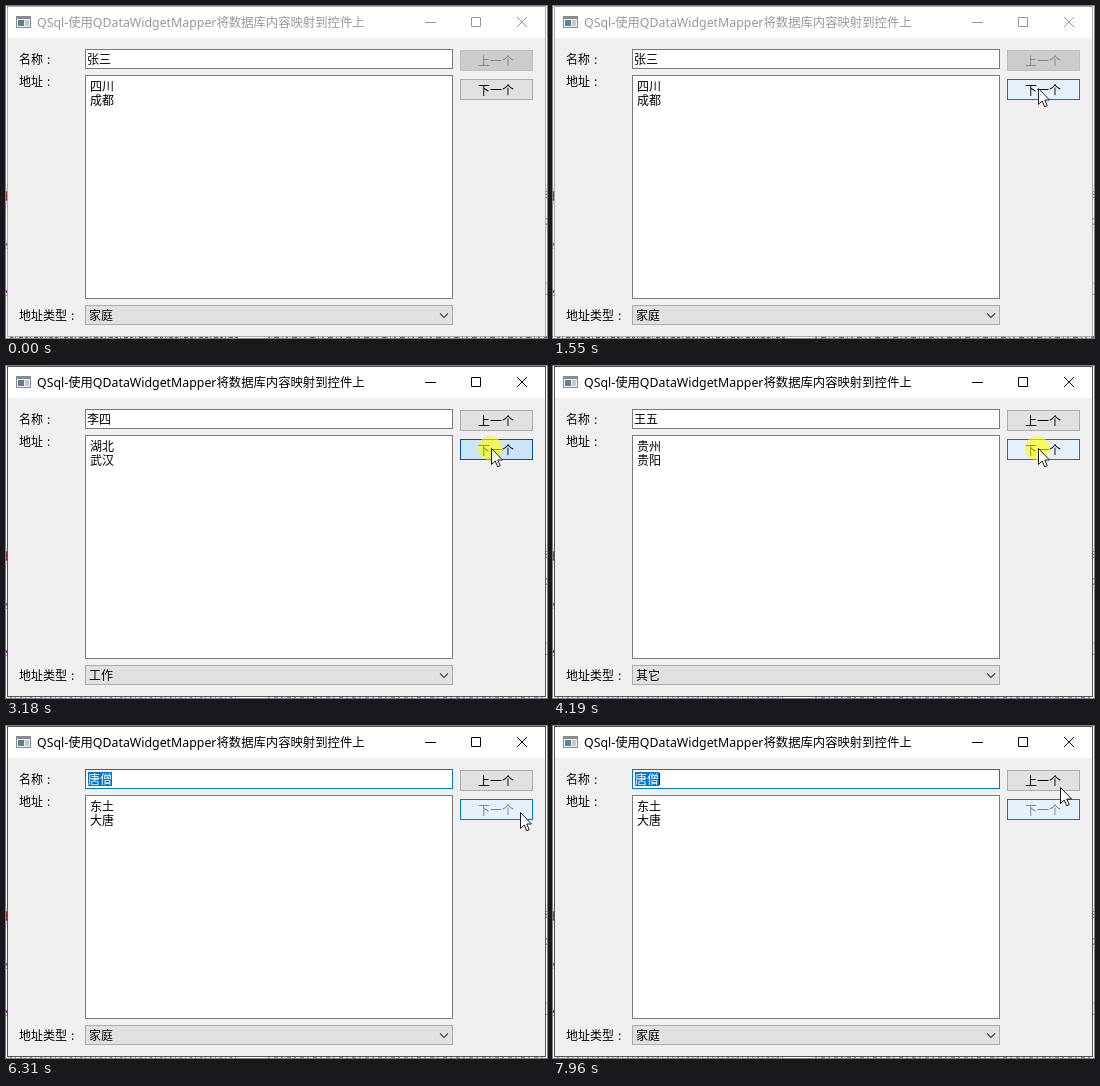
Recreate the animation shown at these times as an HTML page. Size 541 by 332 pixels, loop 8 s.

```html
<!DOCTYPE html>
<html lang="zh-CN">
<head>
<meta charset="utf-8">
<title>QDataWidgetMapper</title>
<style>
  html, body { margin: 0; width: 541px; height: 332px; overflow: hidden; background: #fff; }
  svg { display: block; }
  text { font: 12px "Noto Sans CJK SC", "Noto Sans CJK", "Noto Sans CJK JP", sans-serif; }
  .title { font: 12.35px "Noto Sans", "Noto Sans CJK SC", "Noto Sans CJK", "Noto Sans CJK JP", sans-serif; }
  .mid { text-anchor: middle; }
  .code { font: 13px "Noto Sans Mono", monospace; }
  .box { fill: #fff; stroke: #7a7a7a; }
  .flat { fill: #e1e1e1; stroke: #adadad; }
  .off { fill: #ccc; stroke: #bfbfbf; }
  .gray { fill: #838383; }
  .line { fill: none; stroke: currentColor; }

  /* Hard switches */
  .sw { opacity: 0; animation: 8s step-end infinite; }
  .idle { animation-name: idle; }
  .active { animation-name: active; }
  .r1 { animation-name: r1; }
  .r2 { animation-name: r2; }
  .r3 { animation-name: r3; }
  .r4 { animation-name: r4; }
  .open { animation-name: open; }
  .caret { animation-name: caret; }
  .click { animation-name: click; }
  .arrow { animation-name: arrow; }
  .beam { animation-name: beam; }
  @keyframes idle { 0% { opacity: 1 } 23.875%, 100% { opacity: 0 } }
  @keyframes active { 0% { opacity: 0 } 23.875%, 100% { opacity: 1 } }
  @keyframes r1 { 0% { opacity: 1 } 25.5%, 100% { opacity: 0 } }
  @keyframes r2 { 0%, 40.125%, 100% { opacity: 0 } 25.5% { opacity: 1 } }
  @keyframes r3 { 0%, 54.25%, 100% { opacity: 0 } 40.125% { opacity: 1 } }
  @keyframes r4 { 0% { opacity: 0 } 54.25%, 100% { opacity: 1 } }
  @keyframes open { 0% { opacity: 1 } 54.25%, 100% { opacity: 0 } }
  @keyframes caret {
    0%, 60.875%, 74.25%, 87.375% { opacity: 0 }
    54.25%, 67%, 80.625%, 94.125%, 100% { opacity: 1 }
  }
  @keyframes click {
    0%, 25.5%, 40.125%, 54.25%, 67%, 100% { opacity: 0 }
    23.875%, 38.25%, 52.375%, 64.75% { opacity: 1 }
  }
  @keyframes arrow { 0%, 4.9375% { opacity: 0 } 4.125%, 15.225%, 100% { opacity: 1 } }
  @keyframes beam { 0%, 15.225%, 100% { opacity: 0 } 4.9375% { opacity: 1 } }

  /* Button fades: normal, hover, pressed */
  .next { animation: next 8s linear infinite; }
  @keyframes next {
    0%, 16.8875% { fill: #e1e1e1; stroke: #adadad }
    19.375%, 23.875%, 25.6%, 38.25%, 42.25%, 52.375%, 56.125%, 100% { fill: #e5f1fb; stroke: #0078d7 }
    24.6875%, 25.5%, 39.2%, 40.125%, 53.4%, 54.25% { fill: #cce4f7; stroke: #005499 }
  }

  .pointer { animation: pointer 8s step-end infinite; }
  @keyframes pointer {
    0% { transform: translate(460px, 356px) }
    4.125% { transform: translate(460px, 356px); animation-timing-function: steps(3, start) }
    6.5625% { transform: translate(371px, 227px) }
    10.25% { transform: translate(371px, 227px); animation-timing-function: steps(9, start) }
    17.72% { transform: translate(479px, 90px); animation-timing-function: steps(3, start) }
    20.21% { transform: translate(485px, 82px) }
    76.5% { transform: translate(485px, 82px); animation-timing-function: steps(4, start) }
    79.6625% { transform: translate(514px, 86px); animation-timing-function: steps(3, start) }
    82.4625% { transform: translate(528px, 104px); animation-timing-function: steps(5, start) }
    86.875% { transform: translate(507px, 102px); animation-timing-function: steps(5, start) }
    90.9375% { transform: translate(507px, 87px) }
    94.125% { transform: translate(507px, 87px); animation-timing-function: steps(5, start) }
    99.5%, 100% { transform: translate(507px, 61px) }
  }
</style>
</head>
<body>
<svg width="541" height="332" viewBox="0 0 541 332">
  <defs>
    <g id="caption">
      <text class="title" x="31" y="21" fill="currentColor">QSql-使用QDataWidgetMapper将数据库内容映射到控件上</text>
      <path class="line" d="M419 16.5h11M465.5 11.5h9v9h-9zM511 11l10 10M521 11l-10 10"/>
    </g>
  </defs>

  <!-- Editor behind the window -->
  <rect width="541" height="332" fill="#fff"/>
  <g class="code">
    <text x="-5" y="195" fill="#800000">d</text>
    <text x="-5" y="217" fill="#d08030">l</text>
    <text x="-5" y="243" fill="#405090">e</text>
    <text x="-5" y="290" fill="#800080">e</text>
    <text x="538" y="192" fill="#208020">s</text>
    <text x="538" y="219" fill="#555">o</text>
    <text x="538" y="287" fill="#208020">[</text>
  </g>
  <g class="sw idle" fill="none" stroke-width="2">
    <path d="M4 331H234" stroke="#804080" stroke-dasharray="3 2 1 3 4 2"/>
    <path d="M262 331H541" stroke="#666" stroke-dasharray="2 4 5 3 1 3"/>
  </g>
  <g class="sw active" fill="none">
    <path d="M4 331.5H234" stroke="#a878a8" stroke-dasharray="2 3 1 4"/>
    <path d="M262 331.5H541" stroke="#78a078" stroke-dasharray="2 4 4 3"/>
  </g>

  <!-- Window -->
  <rect x="1.5" y=".5" width="538" height="330" fill="#f0f0f0" stroke="#aaa"/>
  <rect x="2" y="1" width="537" height="31" fill="#fff"/>
  <rect class="sw active" x="1.5" y=".5" width="538" height="330" fill="none" stroke="#555"/>
  <rect x="10.5" y="10.5" width="14" height="11" fill="#eef1f3" stroke="#8a9096"/>
  <rect x="10" y="10" width="15" height="3" fill="#858b91"/>
  <rect x="12" y="14" width="6" height="6" fill="#5f7f93"/>
  <rect x="19" y="14" width="4" height="6" fill="#c4cace"/>
  <g class="sw idle" color="#999"><use href="#caption"/></g>
  <g class="sw active" color="#000"><use href="#caption"/></g>

  <!-- Form -->
  <text x="13" y="58">名称</text><text x="41" y="58">:</text>
  <text x="13" y="80">地址</text><text x="41" y="80">:</text>
  <text x="13" y="314">地址类型</text><text x="65" y="314">:</text>
  <rect class="box" x="79.5" y="43.5" width="367" height="19"/>
  <rect class="box" x="79.5" y="69.5" width="367" height="223"/>
  <rect class="flat" x="79.5" y="299.5" width="367" height="19"/>
  <path class="line" d="M434 307.5l4 4 4-4" color="#444" stroke-width="1.2"/>

  <g class="sw r1">
    <text x="81" y="58">张三</text>
    <text x="84" y="85">四川</text><text x="84" y="99">成都</text>
    <text x="83" y="314">家庭</text>
  </g>
  <g class="sw r2">
    <text x="81" y="58">李四</text>
    <text x="84" y="85">湖北</text><text x="84" y="99">武汉</text>
    <text x="83" y="314">工作</text>
  </g>
  <g class="sw r3">
    <text x="81" y="58">王五</text>
    <text x="84" y="85">贵州</text><text x="84" y="99">贵阳</text>
    <text x="83" y="314">其它</text>
  </g>
  <g class="sw r4">
    <rect x="79.5" y="43.5" width="367" height="19" fill="none" stroke="#0078d7"/>
    <rect x="82" y="46" width="24" height="14" fill="#0078d7"/>
    <text x="82" y="58" fill="#fff">唐僧</text>
    <text x="84" y="85">东土</text><text x="84" y="99">大唐</text>
    <text x="83" y="314">家庭</text>
  </g>
  <rect class="sw caret" x="106" y="47" width="1" height="12"/>

  <!-- Buttons -->
  <g class="mid">
    <g class="sw r1">
      <rect class="off" x="454.5" y="44.5" width="72" height="20"/>
      <text class="gray" x="490" y="60">上一个</text>
    </g>
    <g class="sw" style="animation-name: prev">
      <rect class="flat" x="454.5" y="44.5" width="72" height="20"/>
      <text x="490" y="60">上一个</text>
    </g>
    <rect class="flat next" x="454.5" y="73.5" width="72" height="20"/>
    <text class="sw open" x="490" y="89">下一个</text>
    <text class="sw r4 gray" x="490" y="89">下一个</text>
  </g>
  <style>
    @keyframes prev { 0% { opacity: 0 } 25.5%, 100% { opacity: 1 } }
  </style>

  <!-- Pointer -->
  <circle class="sw click" cx="484" cy="82" r="12" fill="#ff0" fill-opacity=".6"/>
  <g class="pointer">
    <path class="sw arrow" d="M.5 .5V16.5L4.2 13 6.7 18.8 9.2 17.7 6.8 12H11.5Z" fill="#fff" stroke="#1a1a1a"/>
    <path class="sw beam" d="M-3-7.5H-.5M.5-7.5H3M0-7V7M-3 7.5H-.5M.5 7.5H3" fill="none" stroke="#000"/>
  </g>
</svg>
</body>
</html>
```
